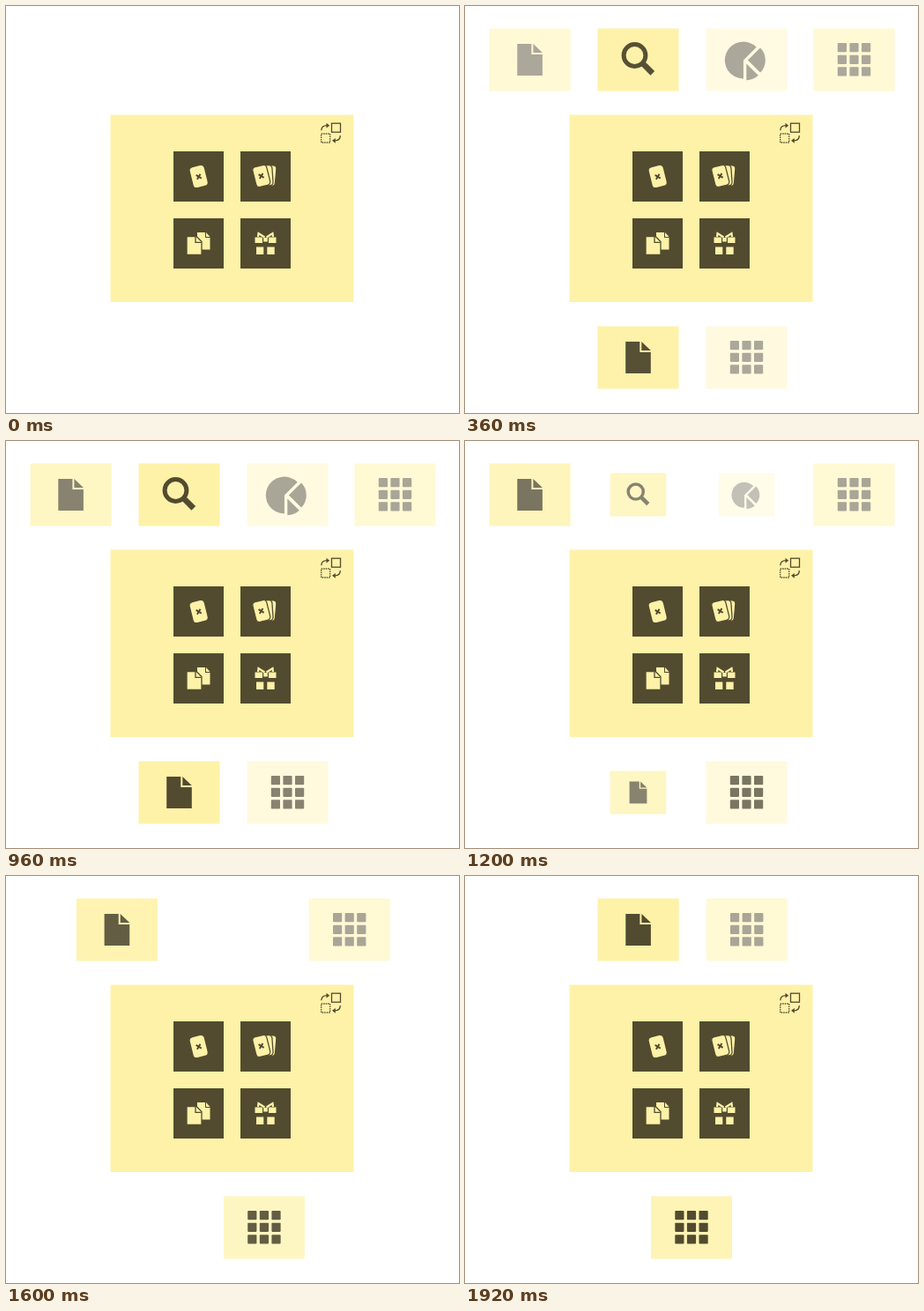
These frames come from a looping animation (514 px wide and 462 px high, 2000 ms). An HTML page:

```html
<!DOCTYPE html>
<html lang="en">
<head>
<meta charset="utf-8">
<title>Card grid</title>
<style>
html, body { margin: 0; width: 100%; height: 100%; overflow: hidden; background: #fff; }
svg { display: block; }
.dark { fill: #524b2f; }
.light { fill: #fef2a8; }
.line { fill: none; stroke: #524b2f; stroke-width: 1.3; }
.edge { fill: #fef2a8; stroke: #524b2f; stroke-width: 1.3; }
</style>
</head>
<body>
<svg id="stage" width="514" height="462" viewBox="0 0 514 462">
  <defs>
    <g id="file"><path d="M-14.3-18H1.8V-6H14.3V18H-14.3ZM3.8-18L14.3-8H3.8Z"/></g>
    <g id="search" fill="none" stroke="currentColor">
      <circle cx="-4" cy="-5" r="12.4" stroke-width="5"/>
      <path d="M5 4L16.3 15.3" stroke-width="6.6"/>
    </g>
    <g id="pie">
      <path d="M-3.7.5L11.1-14.3A21 21 0 1 0-3.7 21.5Z"/>
      <path d="M1.3.5L15.4-13.6A20 20 0 0 1 15.4 14.6Z"/>
      <path d="M-.3 4.5L13.2 17.8A20 20 0 0 1-.3 23.3Z"/>
    </g>
    <g id="grid"></g>
    <g id="playing"><rect x="-8.2" y="-11.7" width="16.4" height="23.4" rx="3.8"/></g>
    <path id="cross" d="M-2.5-2.5L2.5 2.5M2.5-2.5L-2.5 2.5" stroke="#524b2f" stroke-width="2"/>
  </defs>

  <rect class="light" x="118.5" y="123.5" width="276" height="212.5"/>
  <path class="dark" d="M190 165h57v57h-57zM266 165h57v57h-57zM190 241h57v57h-57zM266 241h57v57h-57z"/>

  <!-- single card -->
  <use href="#playing" class="light" transform="translate(218.7 193.5) rotate(-14)"/>
  <use href="#cross" transform="translate(218.7 193.7) rotate(-14)"/>

  <!-- stacked cards -->
  <use href="#playing" class="edge" transform="translate(298 192.2) rotate(5)"/>
  <use href="#playing" class="edge" transform="translate(294.3 192.5) rotate(-4)"/>
  <use href="#playing" class="edge" transform="translate(289.8 193) rotate(-14)"/>
  <use href="#cross" transform="translate(289.6 193) rotate(-14)"/>

  <!-- documents -->
  <path class="light" d="M217 257H226V263H231.5V276.5H217ZM227 257L231.5 262H227Z"/>
  <path class="edge" d="M205 261.5H216L222 267.5V282.5H205Z"/>
  <path class="line" d="M215 262V268.3H221.5"/>

  <!-- gift -->
  <path class="light" d="M282.5 262.5H291V269H282.5ZM292.2 263H296.8V267.5H292.2ZM298 262.5H306.5V269H298ZM284 273.5H292.3V282H284ZM296.3 273.5H304.7V282H296.3Z"/>
  <path d="M293.5 262.5L286.5 258L286 262M295.5 262.5L302.5 258L303 262" fill="none" stroke="#fef2a8" stroke-width="2.2"/>

  <!-- swap -->
  <rect class="line" x="369.5" y="133.2" width="10" height="10"/>
  <rect class="line" x="357.7" y="145" width="10" height="10" stroke-dasharray="1.5 1"/>
  <path class="line" d="M357.8 141.3Q358 135.7 364 135.7M379.3 147Q379.3 152.8 373.3 152.8"/>
  <path class="dark" d="M363.5 132.8L367.2 135.7L363.5 138.6ZM373.8 150L370 152.8L373.8 155.7Z"/>
</svg>
<script>
const NS = "http://www.w3.org/2000/svg";
const LOOP = 2000, STEP = 40, TOP = 61, BOTTOM = 399;
const YELLOW = [254, 242, 168], DARK = [82, 75, 47];
const stage = document.getElementById("stage");

function add(parent, tag, attrs = {}) {
  const el = document.createElementNS(NS, tag);
  for (const k in attrs) el.setAttribute(k, attrs[k]);
  return parent.appendChild(el);
}

for (let i = 0; i < 9; i++) {
  add(document.getElementById("grid"), "rect", {
    x: -18.7 + 13.6 * (i % 3), y: -18.9 + 13.6 * Math.floor(i / 3),
    width: 10.2, height: 10.2, rx: 0.8
  });
}

const span = (t, from, to) => Math.min(1, Math.max(0, (t - from) / (to - from)));
const smooth = u => (1 - Math.cos(Math.PI * u)) / 2;
const tint = (color, a) => `rgb(${color.map(c => Math.round(255 + (c - 255) * a))})`;

const appear = t => 1 - (1 - span(t, 0, 430)) ** 2;
const leave = t => 1 - smooth(span(t, 1080, 1400));
const slide = t => smooth(span(t, 1200, 1920) ** 1.35);
const half = t => 0.5 * appear(t);
const rise = t => half(t) + 0.5 * span(t, 400, 1900);

// icon: opacity of the symbol; card: opacity of its background when it differs
const cards = [
  { shape: "file", x: 73.6, y: TOP, dx: 123, icon: rise },
  { shape: "search", x: 196.5, y: TOP, exits: true, icon: appear },
  { shape: "pie", x: 319.6, y: TOP, exits: true, icon: half, card: t => 0.36 * appear(t) },
  { shape: "grid", x: 441.5, y: TOP, dx: -121.8, icon: half },
  { shape: "file", x: 196.5, y: BOTTOM, exits: true, icon: appear },
  { shape: "grid", x: 319.5, y: BOTTOM, dx: -62.5, icon: rise,
    card: t => 0.38 * appear(t) + 0.47 * span(t, 1240, 1760) }
];

for (const c of cards) {
  c.group = add(stage, "g");
  c.back = add(c.group, "rect", { x: -46, y: -35.5, width: 92, height: 71 });
  c.mark = add(c.group, "use", { href: "#" + c.shape });
}

function draw(t) {
  for (const c of cards) {
    const size = c.exits ? leave(t) : 1;
    const x = c.x + (c.dx || 0) * slide(t);
    const ink = tint(DARK, c.icon(t) * size);
    c.group.setAttribute("transform", `translate(${x} ${c.y}) scale(${size})`);
    c.group.style.display = t > 0 && size > 0.01 ? "" : "none";
    c.back.setAttribute("fill", tint(YELLOW, (c.card || c.icon)(t) * size));
    c.mark.style.fill = c.mark.style.color = ink;
  }
}

const start = performance.now();
function frame() {
  const t = (performance.now() - start) % LOOP;
  draw(Math.floor((t + 2) / STEP) * STEP % LOOP);
  requestAnimationFrame(frame);
}
frame();
</script>
</body>
</html>
```
